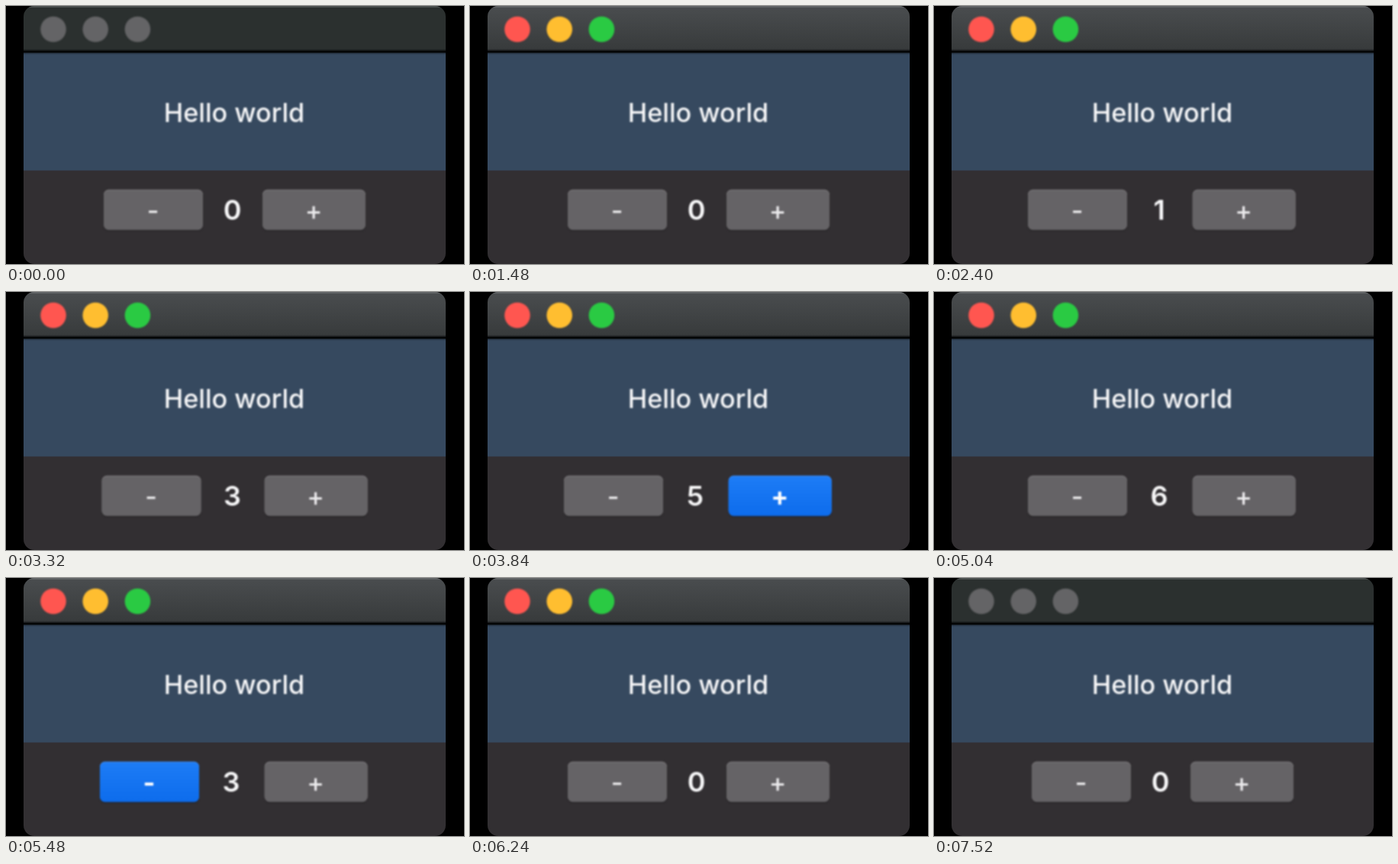
Write an HTML page that moves like this. It is 600x338 px and loops after 7600 ms.

```html
<!DOCTYPE html>
<html lang="en">
<head>
<meta charset="utf-8">
<title>Counter</title>
<style>
  html, body { margin: 0; width: 100%; height: 100%; overflow: hidden; background: #000; }
  svg { display: block; width: 600px; height: 338px; }
  text { font-family: Inter, "Liberation Sans", sans-serif; fill: #f8f8f9; text-anchor: middle; }
  .soft { filter: blur(0.9px); }
  .sign { font-size: 34px; font-weight: 500; fill: #ebeaec; }
  .down .sign { fill: #fff; font-weight: 700; }
  .face { fill: #656366; }
  .down .face { fill: url(#blue); }
  .edge { fill: #777578; }
  .down .edge { fill: #3388f7; }
  .shade { fill: #252325; }
</style>
</head>
<body>
<svg viewBox="0 0 600 338">
  <defs>
    <linearGradient id="bar" x2="0" y2="1">
      <stop stop-color="#4a4d4f"/><stop offset="1" stop-color="#373a3b"/>
    </linearGradient>
    <linearGradient id="blue" x2="0" y2="1">
      <stop stop-color="#1d7cf6"/><stop offset="1" stop-color="#0d6cec"/>
    </linearGradient>
    <clipPath id="frame"><rect x="23" width="553" height="338" rx="14"/></clipPath>
  </defs>
  <g clip-path="url(#frame)">
    <rect id="title" x="23" width="553" height="59"/>
    <rect id="shine" x="23" width="553" height="2"/>
    <rect x="23" y="61" width="553" height="155" fill="#36495f"/>
    <rect x="23" y="215.5" width="553" height="123" fill="#322f32"/>
    <rect class="soft" x="13" y="58" width="573" height="3.5" fill="#050607"/>
  </g>
  <g class="soft" id="content">
    <text x="299" y="152.3" font-size="34.2" font-weight="500">Hello world</text>
    <text id="count" y="280.3" font-size="36" font-weight="600"></text>
  </g>
</svg>
<script>
const LOOP = 7600, FOCUS = 1480, BLUR = 7520, LAG = 40;
const $ = id => document.getElementById(id);
const content = $("content");

function add(parent, tag, attrs) {
  const el = document.createElementNS("http://www.w3.org/2000/svg", tag);
  for (const k in attrs) el.setAttribute(k, attrs[k]);
  return parent.appendChild(el);
}

function button(sign, width) {
  const g = add(content, "g", {});
  const layer = (name, y, height) => add(g, "rect", { class: name, y, width, height, rx: 6.5 });
  layer("shade", 243, 52);
  layer("edge", 240.5, 52);
  layer("face", 242, 51.5);
  add(g, "text", { class: "sign", x: width / 2 - 0.5, y: 280 }).textContent = sign;
  return g;
}

const minus = button("-", 130), plus = button("+", 135);
const lights = ["#ff5650", "#ffbe30", "#2aca43"].map((color, i) =>
  ({ color, el: add(content, "circle", { cx: 62 + 55.2 * i, cy: 30.5, r: 16.8 }) }));

// Evenly spaced clicks; the count follows shortly after each release.
const run = (from, clicks, gap, hold, step) =>
  Array.from({ length: clicks }, (_, i) => ({ press: from + i * gap, hold, step }));
const clicks = [
  run(1960, 1, 0, 360, 1),
  run(2560, 1, 0, 120, 1),
  run(2960, 3, 220, 140, 1),
  run(3760, 2, 200, 120, 1),
  run(4800, 6, 160, 80, -1),
  run(6040, 1, 0, 120, -1)
].flat();

function draw(t) {
  const active = t >= FOCUS && t < BLUR;
  $("title").setAttribute("fill", active ? "url(#bar)" : "#2b302f");
  $("shine").setAttribute("fill", active ? "#616466" : "#4c5150");
  for (const { el, color } of lights) el.setAttribute("fill", active ? color : "#646466");

  let value = 0, rising = true, held = 0;
  for (const { press, hold, step } of clicks) {
    if (t >= press && t < press + hold) held = step;
    if (t >= press + hold + LAG) { value += step; rising = step > 0; }
  }
  minus.classList.toggle("down", held < 0);
  plus.classList.toggle("down", held > 0);

  // The row is laid out again as the label's width changes.
  const wide = rising && (value === 2 || value === 3);
  const left = value === 0 ? 128 : wide ? 125.5 : 123;
  minus.setAttribute("transform", `translate(${left})`);
  plus.setAttribute("transform", `translate(${value ? 338.7 : 336})`);
  $("count").setAttribute("x", left > 123 ? 296.5 : 295);
  $("count").textContent = value;
}

const start = performance.now();
function tick() {
  draw((performance.now() - start) % LOOP);
  requestAnimationFrame(tick);
}
tick();
</script>
</body>
</html>
```
